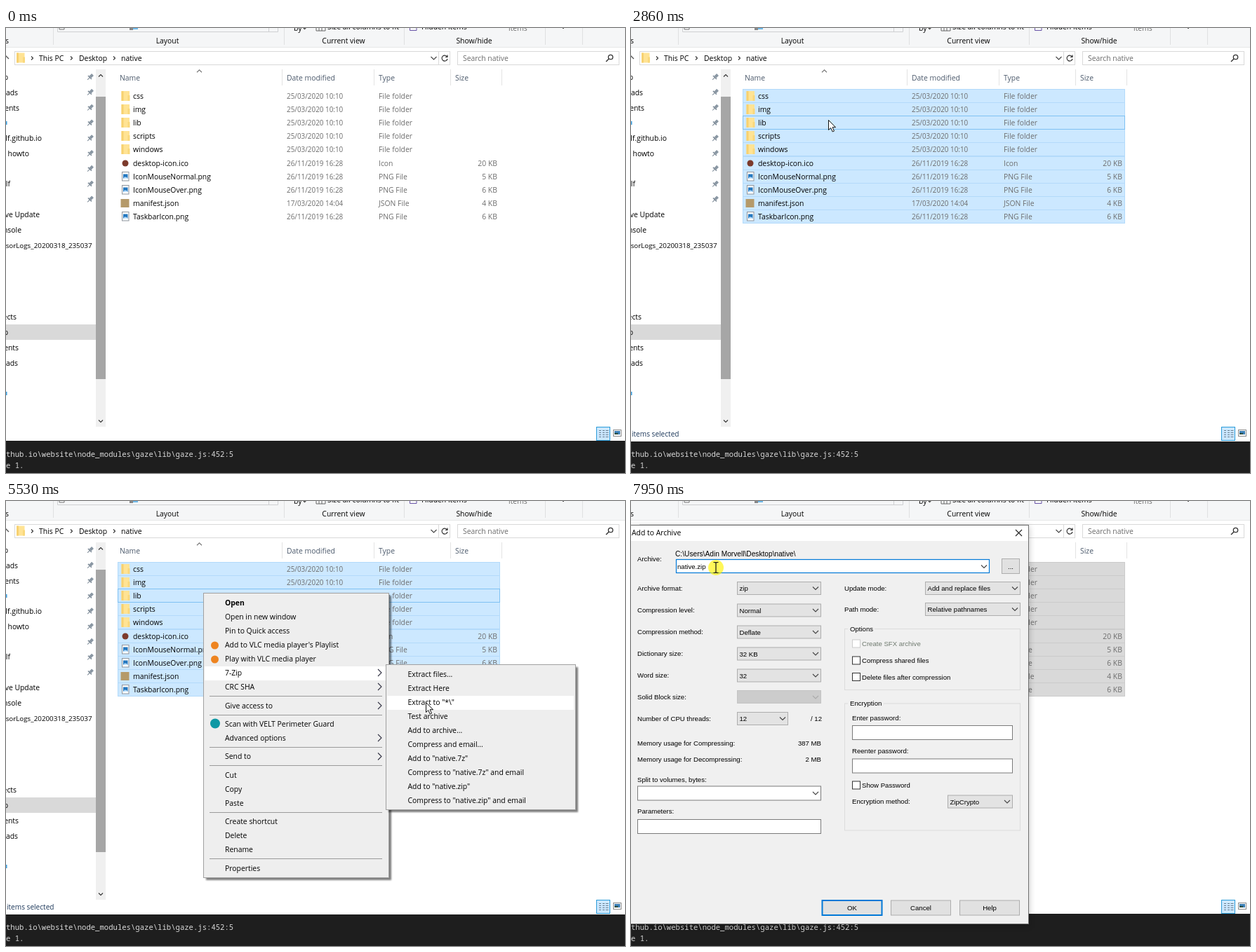
An HTML page for the animation above (8000 ms loop, 882 px wide and 635 px high).

```html
<!DOCTYPE html>
<html lang="en">
<head>
<meta charset="utf-8">
<title>Creating an archive</title>
<style>
html, body { margin: 0; width: 100%; height: 100%; overflow: hidden; background: #fff; }
svg { display: block; width: 882px; height: 635px; }
text { font: 10.4px 'Open Sans', sans-serif; fill: #000; white-space: pre; }
.gray { fill: #6d6d6d; }
.date { fill: #6d6d6d; font-size: 9.9px; }
.small { font-size: 9.8px; }
.head { fill: #4c5a6c; }
.info { fill: #1e395b; font-size: 10.1px; }
.bold { font-weight: 700; }
.term { font: 10.6px 'Noto Sans Mono', monospace; fill: #d8d8d8; }
.dlg { font: 9.6px 'Liberation Sans', sans-serif; }
.path { font: 10.2px 'Liberation Sans', sans-serif; }
.off { font: 9.6px 'Liberation Sans', sans-serif; fill: #6f7a6f; }
.pick { font: 9.6px 'Liberation Sans', sans-serif; fill: #fff; }
</style>
</head>
<body>
<svg id="stage" viewBox="0 0 882 635" xmlns="http://www.w3.org/2000/svg"></svg>
<script>
const LOOP = 8000, ROW_TOP = 87, ROW_H = 19.1, ROWS = 10;

// Drawing helpers: text is placed by its vertical centre
const text = (x, y, s, cls = '', anchor = 'start', id = '') =>
  `<text x="${x}" y="${y + 3.8}" class="${cls}" text-anchor="${anchor}" id="${id}">${s}</text>`;
const rect = (x, y, w, h, fill, stroke = 'none', extra = '') =>
  `<rect x="${x}" y="${y}" width="${w}" height="${h}" fill="${fill}" stroke="${stroke}" ${extra}/>`;
const line = (d, color, width = 1) =>
  `<path d="${d}" fill="none" stroke="${color}" stroke-width="${width}"/>`;
const dot = (x, y, r, fill) => `<circle cx="${x}" cy="${y}" r="${r}" fill="${fill}"/>`;
const right = (x, y, s, color = '#333') => line(`M${x} ${y - s}l${s} ${s}l${-s} ${s}`, color, 1.1);
const down = (x, y, s, color = '#444') => line(`M${x - s} ${y - s / 2}l${s} ${s}l${s} ${-s}`, color, 1.1);
const up = (x, y, s, color = '#444') => line(`M${x - s} ${y + s / 2}l${s} ${-s}l${s} ${s}`, color, 1.1);
const group = (id, body) => `<g id="${id}">${body}</g>`;

const folder = (x, y) =>
  rect(x, y - 7, 11.5, 14, '#ffe394') + rect(x, y - 7, 3, 14, '#f7d171') + rect(x + 9, y - 1, 3, 8, '#f9d87c');
const picture = y =>
  rect(165.5, y - 6.5, 9.5, 12.5, '#fff', '#8d949c') + rect(167, y - 3.5, 6.5, 6.5, '#2478c0') +
  `<path d="M167 ${y + 3}l2.5-3l1.5 1.5l1-1l1.5 2.5z" fill="#bfe3ff"/>`;
const pin = y =>
  `<g transform="translate(120 ${y}) rotate(45)">` + rect(-2, -5, 4, 5, '#8a97a3') +
  rect(-3.5, 0, 7, 1.5, '#7a8895') + rect(-.5, 1, 1, 4.5, '#7a8895') + '</g>';

const files = [
  ['css'], ['img'], ['lib'], ['scripts'], ['windows'],
  ['desktop-icon.ico', 'Icon', 20], ['IconMouseNormal.png', 'PNG File', 5], ['IconMouseOver.png', 'PNG File', 6],
  ['manifest.json', 'JSON File', 4], ['TaskbarIcon.png', 'PNG File', 6]
];

function ribbon() {
  let s = rect(0, 0, 882, 27, '#f5f6f7') + line('M0 27.5H882', '#e6e7e8');
  for (const x of [67.5, 396.5, 567.5, 768.5, 821.5]) s += line(`M${x} 0V24`, '#dfe0e1');
  s += line('M73.5 0V5.5H387.5V0M374.5 0V5', '#cfd0d2') +
    line('M76 0V2H83V0', '#777') + rect(176, 0, 5, 3, '#888') + rect(181, 0, 7, 2, '#6fb9e8') +
    line('M442 0V4H455V0M446 0V4M450 0V4', '#666') + line('M575.5 0V3.5H585V0', '#6a55a8') +
    text(410, 0, 'by') + '<path d="M423 0h5l-2.5 2.5z" fill="#555"/>' +
    text(458, -2, 'Size all columns to fit') + text(592, -2, 'Hidden items') + text(716, 0, 'items', 'gray') +
    rect(793, 0, 2, 1, '#555') + text(4, 18, 's', '', 'end');
  for (const [x, label] of [[230, 'Layout'], [481, 'Current view'], [667, 'Show/hide']])
    s += text(x, 18, label, '', 'middle');
  return s;
}

function addressBar() {
  return rect(12.5, 33.5, 620, 19, '#fff', '#d9d9d9') + rect(643.5, 33.5, 230, 19, '#fff', '#d9d9d9') +
    line('M616.5 34V52', '#d9d9d9') + line('M-4 44l4-4l4 4', '#555', 1.3) + folder(15, 42.5) +
    right(36, 43, 2.5) + text(47, 43, 'This PC') + right(92, 43, 2.5) + text(104, 43, 'Desktop') +
    right(153, 43, 2.5) + text(164, 43, 'native') + down(609.5, 43, 4) +
    line('M628.5 41a4 4 0 1 0 .5 3M629 38.5v3h-3', '#333', 1.2) +
    text(651, 43, 'Search native', 'gray') +
    '<circle cx="861.5" cy="41.5" r="3.2" fill="none" stroke="#333" stroke-width="1.3"/>' +
    line('M859 44l-4 4', '#333', 1.5);
}

function sidebar() {
  let s = rect(0, 423, 128, 22, '#d9d9d9');
  const items = [[3, 70, 'p'], [17, 92, 'ads'], [19, 114, 'ents'], [51, 157, 'lf.github.io'], [33, 179, 'howto'],
    [6, 222, 'lf'], [48, 266, 've Update'], [22, 288, 'nsole'], [122.5, 310, 'sorLogs_20200318_235037', 'small'],
    [15, 412, 'ects'], [3, 434, 'p'], [18, 456, 'ents'], [17, 478, 'ads']];
  for (const [x, y, label, cls] of items) s += text(x, y, label, cls, 'end');
  for (const y of [135, 521]) s += rect(0, y - 2, 1.5, 5, '#3b9fe0');
  for (let i = 0; i < 9; i++) s += pin(70 + 21.8 * i);
  return s + rect(128, 59, 14, 510, '#f0f0f0') + rect(128, 98, 14, 403, '#a6a6a6') +
    up(135, 68, 3, '#333') + down(135, 561, 3, '#333');
}

function fileList() {
  let s = rect(154, 59, 239, 24, '#d9ebf9', 'none', 'id="headHover"');
  for (const x of [393.5, 524.5, 633.5, 706.5]) s += line(`M${x} 59V82`, '#e3e3e3');
  for (const [x, label] of [[162, 'Name'], [400, 'Date modified'], [531, 'Type'], [640, 'Size']])
    s += text(x, 71, label, 'head');
  s += up(275.5, 61.5, 3.5, '#777');
  files.forEach((f, i) => {
    const y = Math.round(ROW_TOP + ROW_H * i);
    s += rect(159.5, y + .5, 544, 19, '#cce8ff', '#b3dafa', `id="row${i}"`);
  });
  s += rect(159.5, 0, 544, 19, 'none', '#7fc1f3', 'id="focusRow"');
  files.forEach(([name, type = 'File folder', size], i) => {
    const y = Math.round(97 + ROW_H * i);
    const stamp = i < 5 ? '25/03/2020 10:10' : i === 8 ? '17/03/2020 14:04' : '26/11/2019 16:28';
    s += i < 5 ? folder(164.5, y) : i === 5 ? dot(170, y, 4.5, '#7c3a2c') :
      i === 8 ? rect(163.5, y - 6, 12, 12, '#b59a6a') : picture(y);
    s += text(181, y, name) + text(400, y, stamp, 'date') + text(531, y, type, 'gray');
    if (size) s += text(700, y, size + ' KB', 'gray', 'end');
  });
  return s;
}

function statusBar() {
  let s = text(68, 579, '', 'info', 'end', 'status') + text(64, 579, '', 'info', 'start', 'bytes') +
    rect(841.5, 569.5, 19, 19, '#cce8ff', '#2a9bd8');
  for (let i = 0; i < 4; i++)
    s += line(`M845 ${574.5 + 3 * i}h3m2 0h3m1.5 0h4`, '#6b7f90');
  return s + rect(865.5, 573.5, 11, 9, '#fff', '#8a8a8a') + rect(867, 575, 8, 5, '#3c7fb5') +
    rect(867, 578, 5, 2, '#2f4f3f');
}

const terminal = () => rect(0, 589, 882, 46, '#1e1e1e') +
  rect(0, 589, 882, 1, '#fff', 'none', 'id="activeEdge"') +
  text(0, 608.5, 'thub.io\\website\\node_modules\\gaze\\lib\\gaze.js:452:5', 'term') + text(0, 624.5, 'e 1.', 'term');

// Context menu: [centre y, label, has submenu]
const mainItems = [[145, 'Open'], [165, 'Open in new window'], [185, 'Pin to Quick access'],
  [205, "Add to VLC media player's Playlist"], [225, 'Play with VLC media player'], [245, '7-Zip', 1],
  [265, 'CRC SHA', 1], [292, 'Give access to', 1], [318, 'Scan with VELT Perimeter Guard'],
  [338, 'Advanced options', 1], [364.5, 'Send to', 1], [391, 'Cut'], [411, 'Copy'], [431, 'Paste'],
  [457.5, 'Create shortcut'], [477.5, 'Delete'], [497.5, 'Rename'], [524, 'Properties']];
const subItems = ['Extract files...', 'Extract Here', 'Extract to "*\\"', 'Test archive', 'Add to archive...',
  'Compress and email...', 'Add to "native.7z"', 'Compress to "native.7z" and email',
  'Add to "native.zip"', 'Compress to "native.zip" and email'];

const panel = (x, y, w, h) => rect(x + 4, y + 4, w - 1, h - 1, '#000', 'none', 'opacity=".5" filter="url(#soft)"') +
  rect(x + .5, y + .5, w - 1, h - 1, '#eee', '#a0a0a0');

function mainMenu() {
  let s = panel(281, 131, 265, 407) + rect(283, 0, 261, 20, '#fff', 'none', 'id="mainHover"');
  for (const y of [278.5, 305.5, 351.5, 377.5, 444.5, 510.5]) s += line(`M290 ${y}H536`, '#9a9a9a');
  mainItems.forEach(([y, label, more], i) => {
    s += text(312, y, label, i ? '' : 'bold');
    if (more) s += right(530, y, 5, '#334');
  });
  return s + dot(297.5, 206, 5.5, '#ee8420') + dot(297.5, 226, 5.5, '#ee8420') + dot(298, 317.5, 7, '#0e98a4');
}

const subMenu = () => panel(541, 233, 271, 208) + rect(543, 0, 266, 20, '#fff', 'none', 'id="subHover"') +
  subItems.map((label, i) => text(572.5, 247 + 20 * i, label)).join('');

function dialog() {
  const combo = (x, y, w, label, id = '') =>
    rect(x + .5, y - 9, w - 1, 18, '#e3e3e3', '#adadad', `id="${id}"`) + text(x + 3.5, y, label, 'dlg') + down(x + w - 8, y, 4);
  const field = (x, y, w) => rect(x + .5, y - 10, w - 1, 20, '#fff', '#7a7a7a');
  const button = (x, y, w, label, stroke = '#adadad', width = 1) =>
    rect(x + .5, y - 10.5, w - 1, 21, '#e1e1e1', stroke, `stroke-width="${width}"`) + text(x + w / 2, y, label, 'dlg', 'middle');
  const check = (y, label, off) =>
    rect(315.5, y - 5.5, 11, 11, '#fff', off ? '#ccc' : '#333') + text(329, y, label, off ? 'off' : 'dlg');
  const box = (y, h, label, w) =>
    rect(304.5, y + .5, 250, h, 'none', '#dcdcdc') + rect(309, y - 3, w, 7, '#f0f0f0') + text(312, y, label, 'dlg');

  let s = rect(-4, 36, 571, 570, '#000', 'none', 'opacity=".25" filter="url(#blur)"') +
    rect(-4.5, 34.5, 571, 569, '#f0f0f0', '#707070') + rect(-4, 35, 570, 22, '#fff') +
    text(1, 45.5, 'Add to Archive') + line('M548 41l9 9M557 41l-9 9', '#222', 1.1);
  const labels = [[82, 'Archive:'], [124.5, 'Archive format:'], [155.5, 'Compression level:'],
    [186.5, 'Compression method:'], [217.5, 'Dictionary size:'], [248.5, 'Word size:'], [279.5, 'Solid Block size:'],
    [310.5, 'Number of CPU threads:'], [345, 'Memory usage for Compressing:'],
    [368.5, 'Memory usage for Decompressing:'], [397, 'Split to volumes, bytes:'], [442, 'Parameters:']];
  for (const [y, label] of labels) s += text(9, y, label, 'dlg');
  s += text(63, 75.5, 'C:\\Users\\Adin Morvell\\Desktop\\native\\', 'path') +
    rect(64.5, 83.5, 446, 19, '#fff', '#0078d7', 'stroke-width="1.2"') + down(503, 93.5, 4) +
    rect(65.5, 87, 42, 12, '#2a7fd0', 'none', 'id="nameBack"') + text(66, 93, 'native.zip', 'dlg', 'start', 'nameText') +
    button(528, 93, 26, '...');
  s += combo(151, 124.5, 120, 'zip', 'format') + combo(151, 156, 120, 'Normal') + combo(151, 187, 120, 'Deflate') +
    combo(151, 218, 120, '32 KB') + combo(151, 249, 120, '32') +
    rect(151.5, 270.5, 119, 18, '#ccc', '#c3c3c3') + down(263, 280, 4, '#aaa') + combo(151, 310.5, 73, '12');
  s += text(272, 310.5, '/ 12', 'dlg', 'end') + text(271, 345, '387 MB', 'dlg', 'end') + text(271, 368.5, '2 MB', 'dlg', 'end');
  s += field(9, 417, 262) + down(263, 417, 4) + field(9, 464.5, 262);
  s += text(304, 124.5, 'Update mode:', 'dlg') + combo(419, 124.5, 136, 'Add and replace files') +
    text(304, 154, 'Path mode:', 'dlg') + combo(419, 154.5, 136, 'Relative pathnames');
  s += box(182, 87, 'Options', 38) + check(203.5, 'Create SFX archive', true) +
    check(227.5, 'Compress shared files') + check(251, 'Delete files after compression');
  s += box(288.5, 181, 'Encryption', 51) + text(315, 309.5, 'Enter password:', 'dlg') + field(315, 330.5, 229) +
    text(315, 356.5, 'Reenter password:', 'dlg') + field(315, 378, 229) + check(405.5, 'Show Password') +
    text(315, 428.5, 'Encryption method:', 'dlg') + combo(451, 429, 93, 'ZipCrypto');
  return s + button(272, 580.5, 86, 'OK', '#0078d7', 2) + button(370, 580.5, 86, 'Cancel') + button(468, 580.5, 86, 'Help');
}

const pointer = group('arrow', '<path d="M.5.5V14.5L3.7 11.5L6.2 17L8.5 16L6.1 10.7H10.5Z" fill="#fff" stroke="#111"/>') +
  group('beam', line('M-3.5-7.5h2.5l1 1l1-1h2.5M0-6.5V6.5M-3.5 7.5h2.5l1-1l1 1h2.5', '#111', 1.2));

document.getElementById('stage').innerHTML =
  '<defs><filter id="soft"><feGaussianBlur stdDeviation="1"/></filter>' +
  '<filter id="blur"><feGaussianBlur stdDeviation="5"/></filter></defs>' +
  rect(0, 0, 882, 635, '#fff') + ribbon() + addressBar() + sidebar() + fileList() + statusBar() + terminal() +
  rect(0, 0, 0, 0, 'rgba(0,102,204,.333)', '#0078d7', 'id="marquee"') +
  group('menu', mainMenu()) + group('submenu', subMenu()) + group('dialog', dialog()) +
  '<circle id="glow" r="11" fill="#fff200" opacity=".65"/>' + group('cursor', pointer);

const el = {};
document.querySelectorAll('[id]').forEach(node => { if (node.id) el[node.id] = node; });
const show = (id, on) => el[id].setAttribute('display', on ? 'inline' : 'none');
const set = (id, attrs) => { for (const k in attrs) el[id].setAttribute(k, attrs[k]); };
const clamp = (v, lo, hi) => Math.max(lo, Math.min(hi, v));
const within = (t, a, b) => t >= a && t < b;

// Pointer moves: start, end, number of steps, target x, y
const moves = [
  [670, 1140, 7, 163, 350], [1380, 1457, 2, 196, 330], [1611, 1770, 3, 281, 256], [1850, 2150, 5, 366, 90],
  [2230, 2300, 2, 374, 79], [2470, 2470, 1, 372, 70], [2550, 2860, 5, 281, 131], [4040, 4040, 1, 327, 151],
  [4120, 4280, 3, 400, 249], [5120, 5530, 6, 598, 287], [5600, 5680, 2, 612, 313], [5830, 5910, 2, 620, 327],
  [6930, 6930, 1, 602, 312], [7010, 7550, 8, 121, 95]
];
const clicks = [[1534, 2470], [3030, 3180], [6150, 6310], [7860, LOOP]];

function cursorAt(t) {
  let x = 720, y = 602;
  for (const [a, b, n, tx, ty] of moves) {
    if (t < a) break;
    const step = n === 1 ? 1 : Math.min(n, 1 + Math.floor((t - a) / (b - a) * (n - 1) + .01));
    const p = step / n, f = p * p * (3 - 2 * p);
    x += (tx - x) * f;
    y += (ty - y) * f;
  }
  return [x, y];
}

const stepped = (t, start, gap, n) => clamp((1 + Math.floor((t - start) / gap)) / n, 0, 1);

function drawSelection(t) {
  const dragging = within(t, 1534, 2470), [x, y] = cursorAt(t - 80);
  const count = t < 1534 ? 0 : dragging ? clamp(Math.ceil((ROW_TOP + ROW_H * ROWS - y) / ROW_H), 0, ROWS) : ROWS;
  const active = t < 6310;
  for (let i = 0; i < ROWS; i++) {
    show('row' + i, i >= ROWS - count);
    set('row' + i, { fill: active ? '#cce8ff' : '#d9d9d9', stroke: active ? '#b3dafa' : '#cbcbcb' });
  }
  const focus = dragging ? ROWS - count : Math.floor((cursorAt(Math.min(t, 3180))[1] - ROW_TOP) / ROW_H);
  show('focusRow', active && count > 0 && focus >= 0);
  set('focusRow', { y: Math.round(ROW_TOP + ROW_H * focus) + .5 });
  show('headHover', t >= 2470 && t < 3000 && cursorAt(t)[1] < 83);
  show('activeEdge', active && t >= 1534);

  show('marquee', dragging && x > 197);
  set('marquee', { x: 196.5, y: Math.round(y) + .5, width: Math.max(0, Math.round(x) - 196), height: Math.max(0, 330 - Math.round(y)) });

  const size = [, '5.10', '8.77', '14.3', '18.9', '38.8'][count];
  el.status.textContent = count ? count === 1 ? '1 item selected' : count + ' items selected' : '';
  el.bytes.textContent = size ? size + ' KB' : '';
  set('status', { x: count === 1 ? 58 : 68.5 });
  set('bytes', { x: count === 1 ? 64 : 74 });
}

function drawMenus(t, x, y) {
  const open = within(t, 3180, 6310), subOpen = within(t, 4660, 6310), inSub = subOpen && x >= 541;
  show('menu', open);
  show('submenu', subOpen);
  set('menu', { opacity: stepped(t, 3180, 76, 4) });
  set('submenu', { opacity: stepped(t, 4660, 80, 3) });
  const item = inSub ? mainItems[5] : mainItems.find(([c]) => Math.abs(y - c) <= 10);
  show('mainHover', t >= 4040 && item);
  if (item) set('mainHover', { y: item[0] - 9 });
  show('subHover', inSub);
  set('subHover', { y: 238 + 20 * Math.floor((y - 238) / 20) });
}

function drawDialog(t, x, y) {
  const rest = Math.pow(1 - stepped(t, 6542, 78, 4), 1.6), k = 1 - .064 * rest;
  show('dialog', t >= 6542);
  set('dialog', { opacity: 1 - rest, transform: `translate(281 318) scale(${k}) translate(-281 -318)` });
  const picked = t < 7860, hot = within(t, 7470, 7710);
  show('nameBack', picked);
  set('nameText', { class: picked ? 'pick' : 'dlg' });
  set('format', { fill: hot ? '#e5f1fb' : '#e3e3e3', stroke: hot ? '#0078d7' : '#adadad' });
}

function render(t) {
  const [x, y] = cursorAt(t);
  drawSelection(t);
  drawMenus(t, x, y);
  drawDialog(t, x, y);
  show('glow', clicks.some(([a, b]) => within(t, a, b)));
  set('glow', { cx: x, cy: y });
  const typing = t > 7500 && y < 103;
  show('cursor', t >= 670 && !within(t, 3180, 3870));
  show('arrow', !typing);
  show('beam', typing);
  set('cursor', { transform: `translate(${Math.round(x)} ${Math.round(y)})` });
}

const start = performance.now();
function tick() {
  render((performance.now() - start) % LOOP);
  requestAnimationFrame(tick);
}
tick();
</script>
</body>
</html>
```
